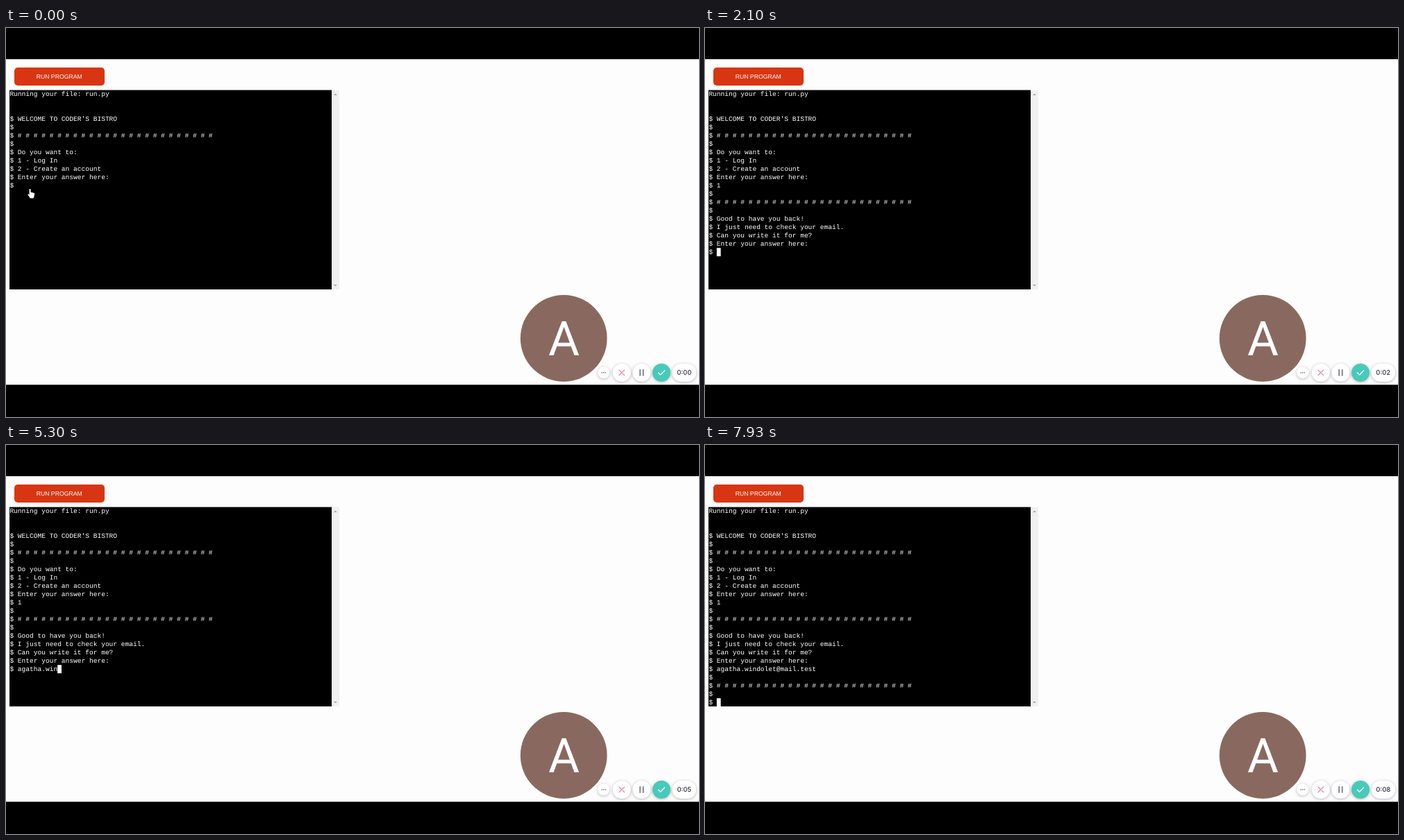
These frames come from a looping animation (998x561 px, 8000 ms). An HTML page:

```html
<!DOCTYPE html>
<html lang="en">
<head>
<meta charset="utf-8">
<title>Terminal session</title>
<style>
html, body { margin: 0; width: 100%; height: 100%; overflow: hidden; background: #000; }
svg { display: block; width: 100%; height: 100%; }
text { fill: #fff; text-rendering: geometricPrecision; white-space: pre; }
#lines text { font: 9.55px "Liberation Mono", monospace; }
.label { font: 8.7px "Liberation Sans", sans-serif; text-anchor: middle; }
.letter { font: 69px Roboto, sans-serif; text-anchor: middle; }
#timer { font: 500 9.4px Inter, sans-serif; text-anchor: middle; fill: #2d2d44; }
.pads { fill: #fff; filter: drop-shadow(0 1px 2px rgba(0, 0, 0, .28)); }
.icon { fill: none; stroke-width: 1.4; stroke-linecap: round; stroke-linejoin: round; }
</style>
</head>
<body>
<svg viewBox="0 0 998 561">
  <defs><clipPath id="screen"><rect x="5" y="90" width="464" height="287"/></clipPath></defs>
  <rect width="998" height="561"/>
  <rect y="45" width="998" height="469.5" fill="#fdfdfd"/>

  <rect x="12" y="57" width="130" height="26" rx="5" fill="#d83612"/>
  <text class="label" x="76.7" y="73">RUN PROGRAM</text>

  <rect x="5" y="89.5" width="464" height="287.5"/>
  <rect x="469" y="89.5" width="11" height="287.5" fill="#f1f1f1"/>
  <path d="M472 97l2.4-2.6 2.4 2.6zM472 370l2.4 2.6 2.4-2.6z" fill="#a5a5a5"/>
  <g clip-path="url(#screen)">
    <g id="lines"></g>
    <rect id="caret" width="5.8" height="12" fill="#fff"/>
  </g>
  <path id="hand" fill="#fff" d="M33.6 233.2c0-1.5 1.9-1.5 1.9 0v3.6l4.3.9c1 .2 1.5.9 1.3 1.9l-.6 3.3-1 2.6h-4.6l-3.2-4.6c-.7-1.1.5-1.9 1.3-1.1l.6.6z"/>

  <circle cx="803.2" cy="447.5" r="62.4" fill="#89695f"/>
  <text class="letter" x="803.4" y="472.3">A</text>

  <g class="pads">
    <circle cx="860.7" cy="497" r="8.5"/>
    <circle cx="886.8" cy="497" r="13"/>
    <circle cx="915.4" cy="497" r="13"/>
    <circle cx="944" cy="497" r="13" fill="#48cab9"/>
    <rect x="959.5" y="484" width="34.5" height="26" rx="13"/>
  </g>
  <path class="icon" stroke="#3c3c50" d="M858.2 497h.01M860.7 497h.01M863.2 497h.01"/>
  <path class="icon" stroke="#e58fa8" d="M883 493.2l7.6 7.6M890.6 493.2l-7.6 7.6"/>
  <path class="icon" stroke="#85858f" style="stroke-width:2;stroke-linecap:butt" d="M913.2 492.3v9.4M917.7 492.3v9.4"/>
  <path class="icon" stroke="#fff" d="M939.5 497.2l3 3 6-6.3"/>
  <text id="timer" x="976.7" y="500.4"></text>
</svg>
<script>
const LOOP = 8000, ROW = 12, CHAR = 5.73, LEFT = 5.4, BASE = 98;
const $ = id => document.getElementById(id);
const rule = '# '.repeat(25).trim();
const email = 'agatha.windolet@mail.test';

const intro = ['Running your file: run.py', '', '', "$ WELCOME TO CODER'S BISTRO", '$', '$ ' + rule, '$',
  '$ Do you want to:', '$ 1 - Log In', '$ 2 - Create an account', '$ Enter your answer here:'];
const login = ['$', '$ ' + rule, '$', '$ Good to have you back!', '$ I just need to check your email.',
  '$ Can you write it for me?', '$ Enter your answer here:'];

const HAND_OFF = 130, FOCUS = 470, PRESS = 1130, ENTER = 1330, SUBMIT = 7370;
// [time, characters typed]
const typing = [[3830, 1], [5070, 9], [5300, 10], [6070, 15], [6170, 16], [6470, 17], [7230, 25]];

function typed(t) {
  if (t < typing[0][0]) return 0;
  for (let i = 1; i < typing.length; i++) {
    const [t0, n0] = typing[i - 1], [t1, n1] = typing[i];
    if (t < t1) return Math.floor(n0 + (n1 - n0) * (t - t0) / (t1 - t0));
  }
  return email.length;
}

function screenLines(t) {
  if (t < ENTER) return [...intro, '$ ' + (t < PRESS ? '' : '1')];
  const lines = [...intro, '$ 1', ...login, '$ ' + email.slice(0, typed(t))];
  return t < SUBMIT ? lines : [...lines, '$', '$ ' + rule, '$', '$ '];
}

const rows = Array.from({ length: 24 }, (_, i) => {
  const row = document.createElementNS('http://www.w3.org/2000/svg', 'text');
  row.setAttribute('x', LEFT);
  row.setAttribute('y', BASE + i * ROW);
  return $('lines').appendChild(row);
});

function setText(node, text) {
  if (node.textContent !== text) node.textContent = text;
}

function show(node, on) {
  node.setAttribute('visibility', on ? 'visible' : 'hidden');
}

function draw(t) {
  const lines = screenLines(t), last = lines.length - 1;
  rows.forEach((row, i) => setText(row, lines[i] || ''));
  $('caret').setAttribute('x', LEFT + lines[last].length * CHAR);
  $('caret').setAttribute('y', 89.2 + last * ROW);
  show($('caret'), t >= FOCUS);
  show($('hand'), t < HAND_OFF);
  setText($('timer'), '0:0' + Math.floor((t + 24) / 994));
}

const start = performance.now();
function tick() {
  draw((performance.now() - start) % LOOP);
  requestAnimationFrame(tick);
}
tick();
</script>
</body>
</html>
```
